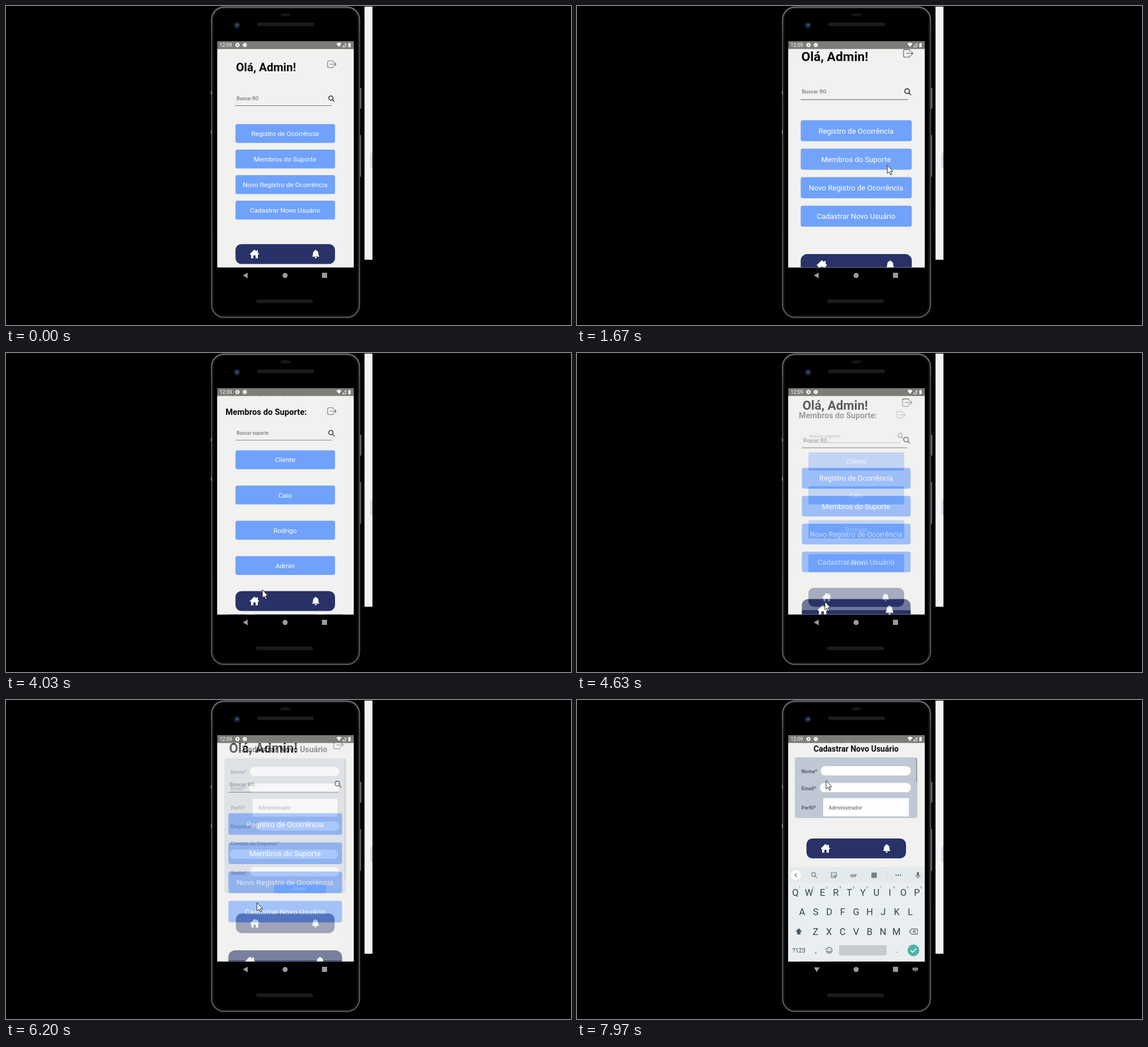
An HTML page that plays this animation: 996 by 562 pixels, repeating every 8000 ms.

```html
<!DOCTYPE html>
<html lang="pt-BR">
<head>
<meta charset="utf-8">
<title>App de ocorrências</title>
<style>
  html, body { margin: 0; width: 100%; height: 100%; overflow: hidden; background: #000; }
  svg { display: block; width: 100vw; height: 100vh; }
  text { font-family: Roboto, "Liberation Sans", sans-serif; }
  .mid { text-anchor: middle; }
  .bold { font-weight: 700; }
  .line { fill: none; stroke-linecap: round; stroke-linejoin: round; }
</style>
</head>
<body>
<svg viewBox="0 0 996 562">
  <defs>
    <clipPath id="screenClip"><rect x="372.5" y="75.5" width="240.5" height="385"/></clipPath>
    <clipPath id="panelClip"><rect class="panelSize" x="384" y="101" width="216" height="240" rx="4"/></clipPath>
    <linearGradient id="bezel" x1="0" y1="0" x2="0" y2="1">
      <stop offset="0" stop-color="#6a6c70"/><stop offset=".1" stop-color="#46474b"/>
      <stop offset=".6" stop-color="#4a4b50"/><stop offset="1" stop-color="#55554f"/>
    </linearGradient>
    <g id="lens" class="line" stroke="#222" stroke-width="1.3">
      <circle r="3.8" cx="-.8" cy="-.8"/><path d="M2 2L5 5"/>
    </g>
    <g id="exit" class="line" stroke="#77777c" stroke-width="1.2">
      <path d="M577 99V98Q577 96.500 575 96.500H569Q567 96.500 567 98.500V106.500Q567 108.500 569 108.500H575Q577 108.500 577 107V106M571.500 102.500H582M579 99.500L582 102.500L579 105.500"/>
    </g>
    <g id="tabBar">
      <rect x="404.500" y="419.500" width="175.500" height="35" rx="10.500" fill="#283267"/>
      <path fill="#fff" d="M438 429L441.500 432.400V430.500H444V434.800L446.300 437L445 438.300L444 437.400V444.500H440V439.500H436V444.500H432V437.400L431 438.300L429.700 437Z"/>
      <path fill="#fff" d="M546 429.500Q547 429.500 547 430.700Q550.700 431.700 550.700 436Q550.700 439.500 552.500 441.500H539.500Q541.300 439.500 541.300 436Q541.300 431.700 545 430.700Q545 429.500 546 429.500ZM544 442.300H548Q547.700 444.500 546 444.500Q544.300 444.500 544 442.300Z"/>
    </g>
  </defs>
  <rect width="996" height="562"/>

  <!-- phone -->
  <path fill="#6a6a74" d="M623 144h2.500q1 0 1 2v33q0 2-1 2H623ZM623 227h2q1 0 1 2v70q0 2-1 2H623Z"/>
  <rect x="362.500" y="2" width="260.500" height="546.500" rx="22" stroke="url(#bezel)" stroke-width="2.600"/>
  <rect x="365.500" y="4.500" width="254.500" height="541.500" rx="20" fill="none" stroke="#1d1e20"/>
  <path d="M362 150V156M362 218V225" stroke="#8a8a90" stroke-width="1.500"/>
  <rect x="443" y="29" width="100" height="6.500" rx="3" fill="#1b1b1d"/>
  <rect x="441" y="517" width="100" height="6.500" rx="3" fill="#1b1b1c"/>
  <ellipse cx="492.500" cy="15.500" rx="9.500" ry="3" fill="#14141a"/>
  <circle cx="407" cy="34" r="5" fill="#18203a" stroke="#2a2b30"/>
  <circle cx="407.500" cy="33.500" r="2" fill="#3c5ba0"/>
  <rect x="632" y="1" width="14" height="446" fill="#f3f3f1"/>
  <path d="M646 258h-2q-1.500 1-1.500 3v22q0 2 1.500 3h2Z" fill="#d3d5de"/>

  <!-- screen -->
  <rect x="372.500" y="75.500" width="240.500" height="385" fill="#f1f1f0"/>
  <g clip-path="url(#screenClip)">
    <g id="home"></g><g id="members"></g><g id="form"></g><g id="keyboard"></g>
  </g>
  <g id="status">
    <rect x="372.500" y="62" width="240.500" height="13.500" fill="#7d7d78"/>
    <text x="376.500" y="72" font-size="8.800" fill="#fff">12:09</text>
    <circle cx="408" cy="68.700" r="2.400" fill="none" stroke="#fff" stroke-width="1.800"/>
    <circle cx="408" cy="68.700" r="3.500" fill="none" stroke="#fff" stroke-width="1" stroke-dasharray="1.500 1.250"/>
    <circle cx="421" cy="68.700" r="3.800" fill="#e4e4e2"/>
    <path fill="#fff" d="M582.500 66.500Q587 63 591.500 66.500L587 72ZM603.500 66h1v-1h2v1h1v6.500h-4Z"/>
    <path fill="none" stroke="#fff" d="M593 72L599 65.800V72Z"/>
  </g>

  <!-- system navigation -->
  <g fill="#9b9b9b">
    <path id="back" d="M417.500 474.500L426 469.800V479.700Z"/>
    <circle cx="492" cy="474.700" r="4.500"/>
    <rect x="557" y="470" width="9" height="9"/>
    <g id="switcher"><rect x="591.500" y="471.500" width="9.500" height="5" rx="1"/><path d="M594.500 477.500h3.500l-1.750 1.800Z"/>
      <path d="M593 473.300h7M593 475h7" stroke="#222" stroke-width=".7" stroke-dasharray="1 .8"/></g>
  </g>
  <path id="cursor" d="M0 0V14.500L3.400 11.600L5.800 17L8 16L5.700 10.800H10Z" fill="#fff" stroke="#111" stroke-width=".9"/>
</svg>
<script>
const $ = id => document.getElementById(id);
const clamp = v => Math.max(0, Math.min(1, v));
const LOOP = 8000, CX = 492.5, CY = 267.5;

const text = (x, y, size, fill, str, cls = '') =>
  `<text x="${x}" y="${y}" font-size="${size}" fill="${fill}" class="${cls}">${str}</text>`;
const rect = (x, y, w, h, rx, fill, extra = '') =>
  `<rect x="${x}" y="${y}" width="${w}" height="${h}" rx="${rx}" fill="${fill}" ${extra}/>`;
const page = rect(372.5, 75.5, 240.5, 385, 0, '#f1f1f0');
const button = (label, y, id = '') =>
  `<g id="${id}">${rect(404.5, y, 175.5, 33.3, 3.5, '#70a2fb')}${text(492, y + 21, 11.75, '#fff', label, 'mid')}</g>`;
const search = (label, y, color) =>
  text(406.5, y + 3, 8.2, '#8b8b8b', label, 'bold') +
  `<use href="#lens" x="573.5" y="${y}"/><path d="M404.500 ${y + 12.5}H574" stroke="${color}" stroke-width="1.200"/>`;

$('home').innerHTML = page + text(405.5, 114.500, 20.4, '#080808', 'Olá, Admin!', 'bold') +
  '<use href="#exit"/>' + search('Buscar RO', 163, '#777') +
  button('Registro de Ocorrência', 208) + button('Membros do Suporte', 253, 'pressMembers') +
  button('Novo Registro de Ocorrência', 298) + button('Cadastrar Novo Usuário', 343, 'pressForm') +
  '<use href="#tabBar"/>';

$('members').innerHTML = page + text(387, 108.5, 14.7, '#080808', 'Membros do Suporte:', 'bold') +
  '<use href="#exit"/>' + search('Buscar suporte', 141, '#85859c') +
  ['Cliente', 'Caio', 'Rodrigo', 'Admin'].map((n, i) => button(n, 171.4 + i * 62.1)).join('') +
  '<use href="#tabBar"/>';

const label = (y, str) => text(395.5, y, 9, '#5b5f69', str, 'bold');
const input = (x, y, right = 588.5) =>
  rect(x, y, right - x, 16.5, 8, '#fff', 'stroke="#d8d8d4" stroke-width=".6"');
$('form').innerHTML = page + text(492, 90.5, 14.05, '#080808', 'Cadastrar Novo Usuário', 'mid bold') +
  rect(384, 101, 216, 240, 4, '#c1c8d5', 'class="panelSize"') +
  '<g clip-path="url(#panelClip)">' +
  label(128.5, 'Nome*') + input(429.5, 116.5) + label(158.5, 'Email*') + input(428, 146) +
  label(192.5, 'Perfil*') + rect(434, 173, 151, 32, 0, '#fff') + text(443.5, 192.5, 9.4, '#555', 'Administrador') +
  label(225.5, 'Empresa*') + input(442, 213.5) +
  label(256, 'Contato da Empresa*') + input(393, 263.5, 586) +
  label(308, 'Senha*') + input(430, 294.5) +
  rect(472, 325, 93, 20, 5, '#70a2fb') + text(518, 336, 8.5, '#e4efff', 'Enviar', 'mid') +
  '<rect id="thumb" x="597.500" y="102" width="2" height="215" fill="#9ba0aa"/></g>' +
  '<use id="formBar" href="#tabBar"/>';

const ink = '#37434b';
const keyRow = (keys, x, y) => [...keys].map((k, i) => text(x + i * 23.8, y, 16.5, ink, k, 'mid')).join('');
$('keyboard').innerHTML = rect(372.5, 294, 240.5, 167, 0, '#e9eef1') + rect(372.5, 294, 240.5, 28, 0, '#e4e9ec') +
  '<circle cx="386" cy="308.500" r="9" fill="#fff"/>' +
  `<g class="line" stroke="#6a767e" stroke-width="1.200">
    <path d="M387 305.500L384 308.500L387 311.500"/>
    <circle cx="417" cy="307.500" r="3.300"/><path d="M419.500 310L422.500 313"/>
    <path d="M448.500 304H457.500V310L454.500 313H448.500ZM457 310H454.500V313M451 307.500V308M455 307.500V308M451 310Q452.500 311 454 310"/>
    <path d="M545.500 302V315" stroke="#cfd5d9"/>
    <path d="M597.500 308.500Q597.500 312 601 312T604.500 308.500M601 312V314"/>
  </g>` + rect(519, 304, 9.5, 9.5, 1, '#75828a') + rect(599.3, 303, 3.4, 7.2, 1.7, '#56636b') +
  text(487.5, 311.5, 8, '#5d6a72', 'GIF', 'mid bold') +
  [562.5, 566.5, 570.5].map(x => `<circle cx="${x}" cy="308.500" r="1.200" fill="#5d6a72"/>`).join('') +
  keyRow('QWERTYUIOP', 385, 345) + keyRow('ASDFGHJKL', 397, 379.3) + keyRow('ZXCVBNM', 420.5, 413.7) +
  [...'1234567890'].map((n, i) => text(392.5 + i * 23.8, 332, 5.8, '#6d787f', n, 'mid')).join('') +
  `<path d="M391 402L397 408.300H394V413H388V408.300H385Z" fill="#4c5a62"/>
   <g class="line" stroke="#56636b" stroke-width="1.200"><path d="M586 408L590 403.300H600V412.700H590ZM592.500 406L596.500 410M596.500 406L592.500 410"/>
   <circle cx="444.500" cy="441" r="5.200"/><path d="M442.500 439.500V440M446.500 439.500V440M441.700 442.500Q444.500 445.500 447.300 442.500"/></g>` +
  text(391, 444.8, 10.7, ink, '?123', 'mid') + text(421, 445, 13, ink, ',', 'mid') + text(564, 445, 13, ink, '.', 'mid') +
  rect(462, 432, 84, 18, 2, '#c5cbcf') +
  '<circle cx="593" cy="441" r="10.300" fill="#4bb5a7"/><path class="line" d="M588.500 441.200L591.700 444.400L597.800 438" stroke="#fff" stroke-width="1.600"/>';

// Cursor stops: time, x, y
const stops = [
  [420, 645, 345], [600, 612, 325], [860, 572, 298], [1030, 547, 280.5], [2600, 547, 280.5],
  [3370, 493, 380], [3530, 492, 379.5], [3670, 491, 379], [4030, 452, 417], [4360, 437, 438],
  [4720, 437, 438], [5260, 454, 260], [5340, 454, 260], [5620, 442.5, 357], [6350, 442.5, 357],
  [7000, 452, 145], [7220, 446, 124], [7650, 444, 126], [7900, 439, 140], [7960, 439, 142]
];
function cursorAt(t) {
  const i = stops.findIndex(s => s[0] > t);
  if (i < 0) return stops[stops.length - 1].slice(1);
  const a = stops[i - 1], b = stops[i], k = (t - a[0]) / (b[0] - a[0]);
  return [a[1] + (b[1] - a[1]) * k, a[2] + (b[2] - a[2]) * k];
}

const settle = t => t <= 0 ? 0 : Math.min(1, (1 - Math.exp(-t / 170)) / (1 - Math.exp(-700 / 170)));
const pressed = (t, down, up) => 1 - .8 * clamp((t - down) / 130) * (1 - clamp((t - up) / 250));

function card(id, scale, alpha) {
  const g = $(id);
  g.setAttribute('display', alpha > 0 ? 'inline' : 'none');
  g.setAttribute('opacity', alpha);
  g.setAttribute('transform', `translate(${CX} ${CY}) scale(${scale}) translate(${-CX} ${-CY})`);
}

const OPEN_MEMBERS = 1430, CLOSE_MEMBERS = 4550, OPEN_FORM = 5750, KEYBOARD = 7340;
const fadeIn = t => clamp((t - 415) / 88);

function render(t) {
  const toMembers = settle(t - OPEN_MEMBERS), toHome = settle(t - CLOSE_MEMBERS), toForm = settle(t - OPEN_FORM);
  const members = toMembers - toHome;
  card('home', 1 + .15 * (members + toForm), 1);
  card('members', toHome ? 1 - .1 * toHome : .85 + .15 * toMembers,
    fadeIn(t - OPEN_MEMBERS) * (1 - clamp((t - CLOSE_MEMBERS - 30) / 80)));
  card('form', .85 + .15 * toForm, fadeIn(t - OPEN_FORM));
  $('pressMembers').setAttribute('opacity', pressed(t, 1060, 1430));
  $('pressForm').setAttribute('opacity', pressed(t, 5600, 5740));

  const rise = 1 - (1 - clamp((t - KEYBOARD) / 230)) ** 3;
  const typing = t >= KEYBOARD, compact = t >= KEYBOARD + 150;
  $('keyboard').setAttribute('transform', `translate(0 ${167 * (1 - rise)})`);
  document.querySelectorAll('.panelSize').forEach(r => r.setAttribute('height', compact ? 107 : 240));
  $('thumb').setAttribute('height', compact ? 42 : 215);
  $('formBar').setAttribute('y', compact ? -175.5 : -42.5);
  $('back').setAttribute('transform', typing ? 'rotate(-90 422.500 474.500)' : '');
  $('switcher').setAttribute('display', typing ? 'inline' : 'none');

  const visible = t >= stops[0][0];
  $('cursor').setAttribute('display', visible ? 'inline' : 'none');
  if (visible) $('cursor').setAttribute('transform', `translate(${cursorAt(t)})`);
}

const start = performance.now();
function tick() {
  render((performance.now() - start) % LOOP);
  requestAnimationFrame(tick);
}
tick();
</script>
</body>
</html>
```
